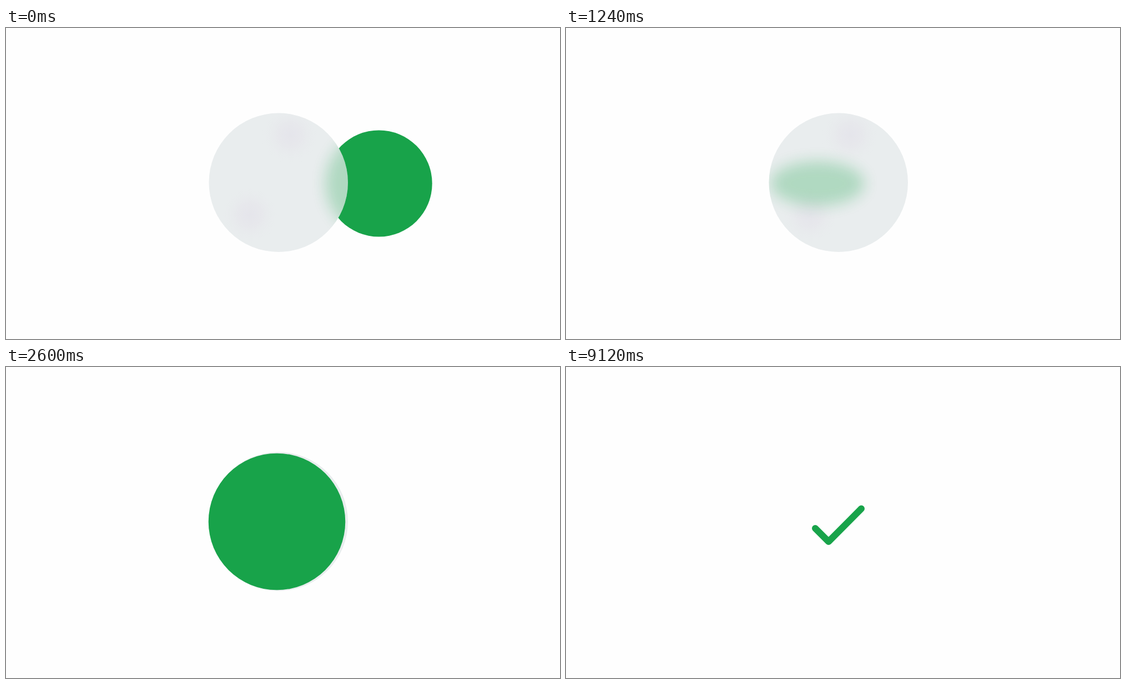
These frames come from a looping animation (998x561 px, 9280 ms). An HTML page:

```html
<!DOCTYPE html>
<html lang="en">
<head>
<meta charset="utf-8">
<title>Success orb</title>
<style>
  html, body { margin: 0; width: 100%; height: 100%; overflow: hidden; background: #fefefe; }
  svg { display: block; width: 100vw; height: 100vh; }
  .ball { fill: #18a34a; }
  .dot { fill: #e6e7ed; }
  #check { fill: none; stroke: #18a34a; stroke-width: 12; stroke-linecap: round; stroke-linejoin: round; }
</style>
</head>
<body>
<svg viewBox="0 0 998 561">
  <defs>
    <clipPath id="lens"><circle cx="490.75" cy="278.75" r="125.25"/></clipPath>
    <filter id="frost" filterUnits="userSpaceOnUse" x="100" y="100" width="800" height="361" color-interpolation-filters="sRGB">
      <feGaussianBlur stdDeviation="13"/>
    </filter>
    <radialGradient id="haze">
      <stop offset="0" stop-color="#e5e5eb"/>
      <stop offset=".4" stop-color="#e7e8ec"/>
      <stop offset="1" stop-color="#e9edee" stop-opacity="0"/>
    </radialGradient>
  </defs>
  <g id="dots"></g>
  <ellipse id="back" class="ball"/>
  <g id="glass">
    <circle cx="490.75" cy="278.75" r="125.25" fill="#e9edee"/>
    <g clip-path="url(#lens)">
      <g id="blobs" fill="url(#haze)">
        <circle cx="512" cy="193" r="54"/>
        <circle cx="439" cy="337" r="54"/>
      </g>
      <g opacity=".27"><g filter="url(#frost)"><ellipse id="ghost" class="ball"/></g></g>
    </g>
  </g>
  <path id="check" d="M449 291L473 315L532 255.500" pathLength="100" stroke-dasharray="100 200"/>
  <ellipse id="front" class="ball"/>
</svg>
<script>
const LOOP = 9280, STEP = 40, LEG = 680, FIRST = 235;
const LEFT = 258, RIGHT = 725, SIZE = 96, FULL = 121.4;
const $ = id => document.getElementById(id);
const [back, ghost, front, check, glass, blobs] =
  ['back', 'ghost', 'front', 'check', 'glass', 'blobs'].map($);

const ramp = (t, from, to) => Math.min(1, Math.max(0, (t - from) / (to - from)));
const mix = (a, b, k) => a + (b - a) * k;
const quart = k => k < .5 ? 8 * k ** 4 : 1 - (2 - 2 * k) ** 4 / 2;
const smooth = k => k * k * (3 - 2 * k);
const out = k => 1 - (1 - k) ** 3;
const backIn = k => 2.70158 * k ** 3 - 1.70158 * k * k;
const set = (el, attrs) => { for (const a in attrs) el.setAttribute(a, attrs[a]); };
const show = (el, on) => { el.style.display = on ? '' : 'none'; };

// resting x, y, radius, fade end
const dots = [
  [266, 232, 12, 3760], [694, 268, 12, 3800], [404, 81, 12, 3720],
  [432, 421, 12, 3840], [601.5, 393.5, 11.5, 4080], [591.5, 107.5, 12.5, 0]
].map(([x, y, r, end]) => {
  const el = document.createElementNS('http://www.w3.org/2000/svg', 'circle');
  el.setAttribute('class', 'dot');
  $('dots').append(el);
  return { el, x, y, r, end };
});

function ballAt(t) {
  const leg = Math.floor((t - FIRST) / LEG);
  if (leg >= 2) {
    const start = FIRST + 2 * LEG;
    const grow = smooth(ramp(t, 2080, 2540));
    const r = mix(SIZE, FULL, grow) * (1 - backIn(ramp(t, 2550, 3030)));
    const x = mix(RIGHT, 488, quart(ramp(t, start, start + 515)));
    return { behind: false, x, y: mix(280.5, 279, grow), rx: r, ry: r };
  }
  const k = (t - FIRST) / LEG - leg;
  const behind = leg !== 0;
  const x = behind ? mix(LEFT, RIGHT, quart(k)) : mix(RIGHT, LEFT, quart(k));
  // shrinks at the far left, stretches while passing behind the glass
  const small = smooth(ramp(t, 860, 960)) * (1 - smooth(ramp(t, 1240, 1360)));
  const speed = behind ? (1 - Math.abs(2 * k - 1)) ** 3 : 0;
  return {
    behind, x, y: 280.5,
    rx: mix(SIZE, 41 + 50 * speed, small),
    ry: mix(SIZE, 40, small)
  };
}

function draw(t) {
  const b = ballAt(t);
  const shape = { cx: b.x, cy: b.y, rx: Math.max(0, b.rx), ry: Math.max(0, b.ry) };
  for (const el of [back, ghost, front]) {
    set(el, shape);
    show(el, b.rx > .1 && (el === front) !== b.behind);
  }

  const drawn = out(ramp(t, 2960, 3440));
  show(check, drawn > 0);
  check.setAttribute('stroke-dashoffset', 100 * (1 - drawn));

  const burst = out(ramp(t, 2880, 3640));
  blobs.style.opacity = 1 - ramp(t, 2880, 3120);
  for (const d of dots) {
    set(d.el, { cx: mix(490.75, d.x, burst), cy: mix(278.75, d.y, burst), r: d.r });
    d.el.style.opacity = d.end
      ? 1 - ramp(t, 3320, d.end)
      : mix(1, .45, ramp(t, 3320, 3840));
    show(d.el, burst > 0 && t < 9120);
  }
  show(glass, t < 9120);
}

let origin;
function tick(now) {
  origin ??= now;
  const t = (now - origin) % LOOP;
  draw(Math.floor(t / STEP) * STEP);
  requestAnimationFrame(tick);
}
draw(0);
requestAnimationFrame(tick);
</script>
</body>
</html>
```
